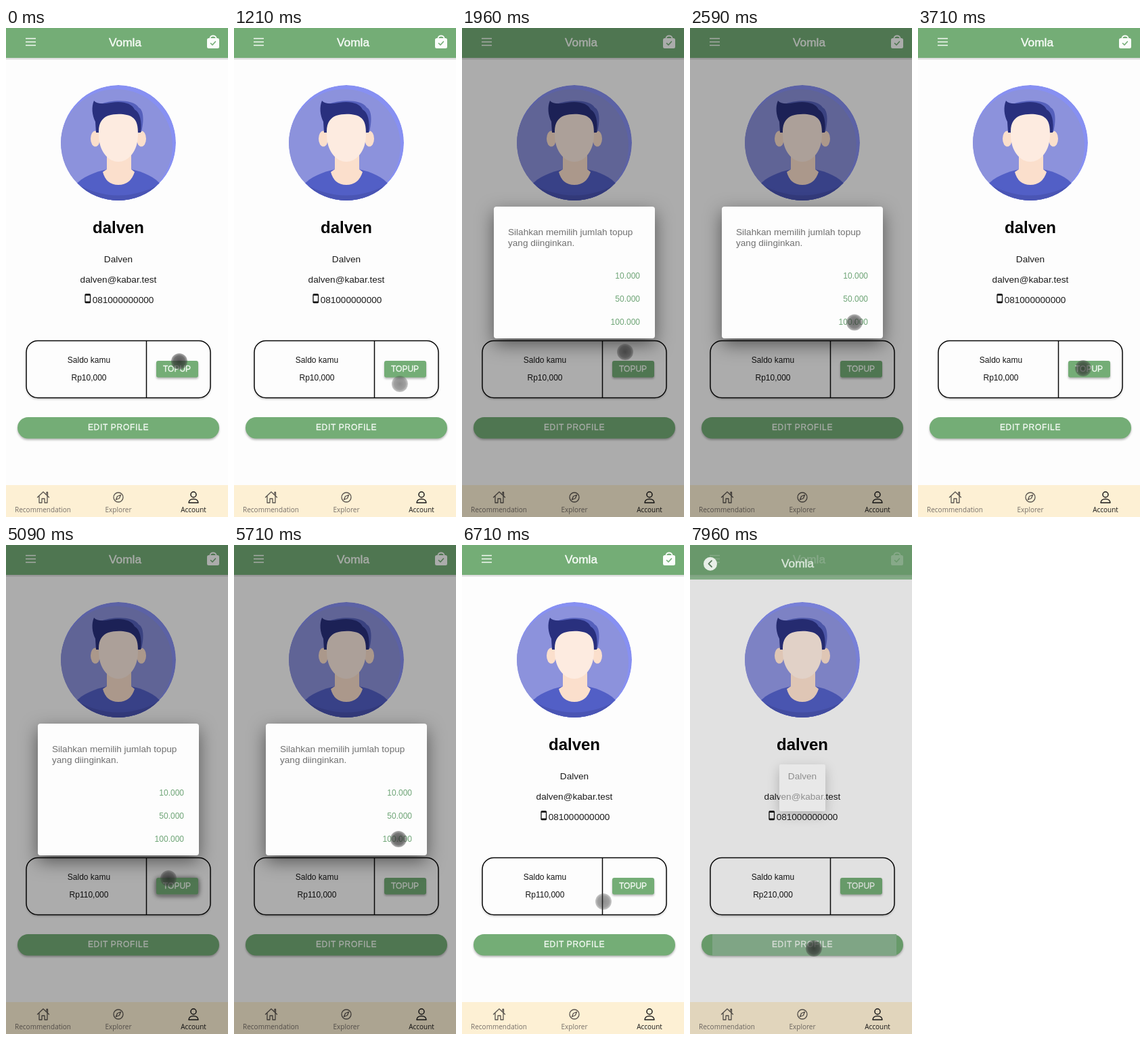
Recreate the animation shown at these times as an HTML page. Size 328x720 px, loop 8000 ms.

```html
<!DOCTYPE html>
<html lang="id">
<head>
<meta charset="utf-8">
<title>Account top-up</title>
<style>
  html, body { margin: 0; width: 100%; height: 100%; overflow: hidden; background: #fdfdfd; }
  svg { display: block; width: 100vw; height: 100vh; font-family: "Liberation Sans", Arial, sans-serif; font-size: 13.6px; }
  .mid { text-anchor: middle; }
  .caps { fill: #f4faf4; stroke: #f4faf4; stroke-width: .3; font-size: 12px; }
  .small { font-size: 12px; }
  .title { fill: #f8fcf8; stroke: #f8fcf8; stroke-width: .4; font-size: 17.3px; }
  .tabs { font: 10px "Open Sans", "Noto Sans", sans-serif; fill: #77706a; }
  .line { fill: none; stroke-linecap: round; stroke-linejoin: round; }
  .veil { mix-blend-mode: multiply; }
  .button { fill: #74ad76; filter: drop-shadow(0 2px 1.5px #b4b4b4); }
</style>
</head>
<body>
<svg viewBox="0 0 328 720">
  <defs>
    <clipPath id="disc"><circle cx="166" cy="169" r="85"/></clipPath>
    <radialGradient id="touch">
      <stop offset="0" stop-color="#252525"/>
      <stop offset=".7" stop-color="#353535" stop-opacity=".9"/>
      <stop offset="1" stop-color="#454545" stop-opacity=".55"/>
    </radialGradient>
  </defs>
  <rect width="328" height="720" fill="#fdfdfd"/>

  <g id="header">
    <rect y="44" width="328" height="2.500" fill="#dedede"/>
    <rect width="328" height="44" fill="#74ad76"/>
    <path d="M29 15.500H44M29 20.500H44M29 25.500H44" stroke="#f4faf4" stroke-width="1.700"/>
    <text class="title mid" x="176" y="26.500">Vomla</text>
    <rect x="297" y="15" width="18" height="15" rx="2.500" fill="#fbfdfb"/>
    <path class="line" d="M301.500 16v-1a4.500 3.500 0 0 1 9 0v1" stroke="#fbfdfb" stroke-width="1.800"/>
    <path class="line" d="M302.500 22.500l2.500 2.500 4.500-5" stroke="#74ad76" stroke-width="1.600"/>
  </g>

  <g clip-path="url(#disc)">
    <circle cx="166" cy="169" r="85" fill="#8790f2"/>
    <circle cx="163" cy="173" r="83" fill="#8c92dc"/>
    <path d="M102 232C112 219 132 212 149 208H185C203 212 220 219 230 232L222 262H110Z" fill="#525fc6"/>
    <path d="M96 225Q166 268 236 225V262H96Z" fill="#4a55b4"/>
    <path d="M106 228Q166 262 226 228L210 222H122Z" fill="#525fc6"/>
    <path d="M149 186H185V208L190 212Q184 231 166 231Q148 231 143 212L149 208Z" fill="#fbdfcc"/>
    <ellipse cx="132" cy="163" rx="7" ry="11.500" fill="#fbdfcc"/>
    <ellipse cx="200" cy="163" rx="7" ry="11.500" fill="#fbdfcc"/>
    <path d="M140 112C155 106 188 104 196 117C204 121 204 138 200 153H190Z" fill="#5560bc"/>
    <path d="M133 154L132 138C127 128 126 116 130 107C134 112 143 112 155 110C172 107 186 111 190 120C198 124 201 138 199 154H134Z" fill="#29307e"/>
    <path d="M137 152C137 139 143 132 151 129C164 125 181 127 186 131C194 136 195 145 195 157C195 181 181 197 166 197C151 197 137 181 137 157Z" fill="#fdebe0"/>
  </g>

  <g class="mid" fill="#1c1c1c">
    <text x="166" y="302" font-size="24" font-weight="bold" fill="#000">dalven</text>
    <text x="166" y="345">Dalven</text>
    <text x="166" y="375">dalven@kabar.test</text>
    <text x="173" y="405">081000000000</text>
  </g>
  <rect x="117" y="392" width="7.500" height="12.500" rx="1" fill="none" stroke="#111" stroke-width="1.300"/>
  <path d="M117 393H124.500M117 403.500H124.500" stroke="#111" stroke-width="2"/>

  <rect x="30" y="460.500" width="272" height="84" rx="17" fill="#fdfdfd" stroke="#080808" stroke-width="1.500" style="filter:drop-shadow(0 2px 1px #d4d4d4)"/>
  <path d="M207.500 461V544" stroke="#080808" stroke-width="1.500"/>
  <g class="mid small" fill="#161616">
    <text x="122.500" y="493">Saldo kamu</text>
    <text x="122.500" y="519" id="balance"></text>
  </g>
  <rect id="pressed" x="222" y="491" width="62" height="25" rx="3" fill="#444" style="filter:blur(4px)"/>
  <rect class="button" x="222" y="490" width="62" height="24.500" rx="3"/>
  <text class="caps mid" x="252.500" y="506">TOPUP</text>
  <rect class="button" x="17" y="573" width="298" height="31.500" rx="15.750"/>
  <rect id="editTint" x="33" y="573" width="272" height="31.500" fill="#8fb995"/>
  <text class="caps mid" x="166" y="592" letter-spacing=".7">EDIT PROFILE</text>

  <rect y="673" width="328" height="47" fill="#fdf0d4"/>
  <g class="line" stroke="#5a5550" stroke-width="1.300">
    <path d="M46.500 691L55 683L63.500 691M49 689V699H53V693H57V699H61V689M60 686V683.500H61.500V688"/>
    <circle cx="166" cy="691" r="7"/>
    <path d="M169.500 687.500L167.500 692.500L162.500 694.500L164.500 689.500Z"/>
    <g stroke="#191919" stroke-width="1.500">
      <circle cx="277" cy="687" r="4"/>
      <path d="M270 699C270 691.500 284 691.500 284 699Z"/>
    </g>
  </g>
  <g class="tabs mid">
    <text x="54.500" y="713">Recommendation</text>
    <text x="166" y="713">Explorer</text>
    <text x="277" y="713" fill="#171717">Account</text>
  </g>

  <rect id="dim" class="veil" width="328" height="720" fill="#aeaeae"/>
  <g id="dialog">
    <rect x="47" y="263" width="238" height="194" rx="4" fill="#fdfdfd" style="filter:drop-shadow(0 9px 13px rgba(0,0,0,.5))"/>
    <g fill="#707070">
      <text x="68" y="304.500">Silahkan memilih jumlah topup</text>
      <text x="68" y="320.500">yang diinginkan.</text>
    </g>
    <g class="small" fill="#6fa577" text-anchor="end">
      <text x="263" y="369">10.000</text>
      <text x="263" y="403">50.000</text>
      <text x="263" y="437">100.000</text>
    </g>
  </g>

  <g id="nextPage">
    <rect class="veil" width="328" height="720" fill="#e3e3e3"/>
    <g id="nextHeader">
      <rect y="-40" width="328" height="84" fill="#6a976c" opacity=".75"/>
      <rect y="40" width="328" height="4" fill="#7fae83" opacity=".6"/>
      <circle cx="30" cy="21" r="10" fill="#e8efe8"/>
      <path class="line" d="M32 16.500L27.500 21L32 25.500" stroke="#5a7a5c" stroke-width="1.800"/>
      <text class="title mid" x="159" y="26.500" opacity=".8">Vomla</text>
    </g>
    <rect x="132" y="323" width="68" height="69" rx="2" fill="#efefef" opacity=".55" style="filter:drop-shadow(0 6px 9px rgba(0,0,0,.4))"/>
  </g>
  <circle id="cursor" r="12" fill="url(#touch)"/>
</svg>
<script>
const LOOP = 8000;
const el = id => document.getElementById(id);
const clamp = v => Math.min(1, Math.max(0, v));
const ramp = (t, start, length) => clamp((t - start) / length);
const easeOut = p => 1 - (1 - p) ** 3;
const smooth = p => p * p * (3 - 2 * p);

// time, x, y, opacity
const path = [
  [0, 256, 491, .78], [600, 252, 506, .6], [1210, 245, 524, .52], [1540, 243, 505, .6],
  [1680, 243, 503, .75], [1960, 241, 477, .72], [2450, 243, 434, .55], [2700, 243, 433, .75],
  [3250, 244, 482, .6], [3710, 244, 501, .72], [4740, 244, 500, .6], [4880, 241, 498, .75],
  [5090, 240, 491, .72], [5480, 243, 434, .55], [5720, 243, 433, .75], [6250, 218, 498, .55],
  [6710, 209, 525, .52], [7350, 186, 589, .55], [7800, 183, 594, .78], [LOOP, 183, 594, .78]
];
const dialogs = [[1640, 2720], [4890, 5750]];

function cursorAt(t) {
  const i = path.findIndex(k => k[0] > t);
  const a = path[i - 1], b = path[i];
  const p = smooth((t - a[0]) / (b[0] - a[0]));
  return a.map((v, k) => v + (b[k] - v) * p);
}

function draw(t) {
  const [, x, y, alpha] = cursorAt(t);
  el("cursor").setAttribute("transform", `translate(${x} ${y})`);
  el("cursor").setAttribute("opacity", alpha);

  let shown = 0, scale = 1;
  for (const [open, close] of dialogs) {
    if (t < open || t > close + 150) continue;
    shown = ramp(t, open, 150) * (1 - ramp(t, close, 150));
    scale = .9 + .1 * easeOut(ramp(t, open, 150));
  }
  el("dim").setAttribute("opacity", shown);
  el("dialog").setAttribute("opacity", shown);
  el("dialog").setAttribute("transform", `translate(166 360) scale(${scale}) translate(-166 -360)`);
  el("pressed").setAttribute("opacity", ramp(t, 4850, 80) * (1 - ramp(t, 5100, 150)));

  el("balance").textContent = t < 4100 ? "Rp10,000" : t < 7100 ? "Rp110,000" : "Rp210,000";

  const enter = easeOut(ramp(t, 7840, 270));
  el("nextPage").setAttribute("opacity", ramp(t, 7840, 100));
  el("editTint").setAttribute("opacity", ramp(t, 7840, 100));
  el("nextHeader").setAttribute("transform", `translate(0 ${40 * (1 - enter)})`);
}

function frame() {
  draw(performance.now() % LOOP);
  requestAnimationFrame(frame);
}
frame();
</script>
</body>
</html>
```
